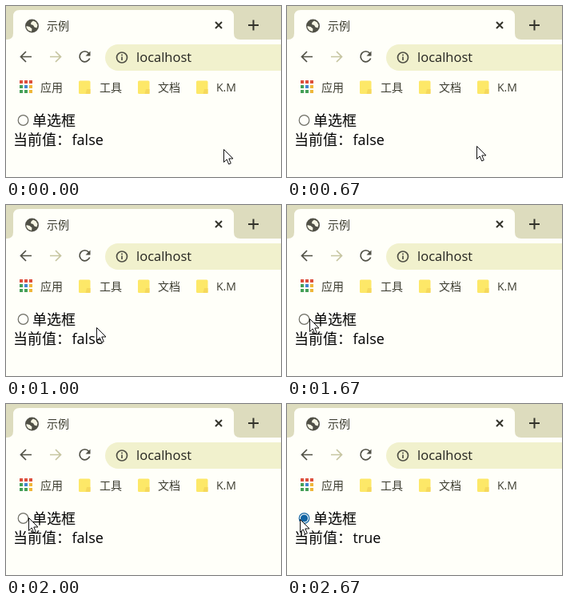
These frames come from a looping animation (344x214 px, 3010 ms). An HTML page:

```html
<!DOCTYPE html>
<html lang="zh-CN">
<head>
<meta charset="utf-8">
<title>示例</title>
<style>
  html, body { margin: 0; width: 100%; height: 100%; overflow: hidden; background: #fffff9; }
  svg { display: block; width: 344px; height: 214px; }
  text { font-family: "Open Sans", "Noto Sans CJK SC", "Noto Sans CJK", sans-serif; }
  .label { font-size: 14px; fill: #3c3c30; }
  .page { font-size: 18px; fill: #000; }
  .icon { fill: none; stroke: #505046; stroke-width: 1.7; }
  .strong { stroke: #33332b; stroke-width: 2; }
  .faint { stroke: #c6c5a0; }
</style>
</head>
<body>
<svg viewBox="0 0 344 214">
  <defs>
    <g id="folder">
      <rect width="14.500" height="16.500" rx="1.500" fill="#fde868"/>
      <path d="M10 10.500H14.500V16.500H8.500Z" fill="#f5d85c"/>
    </g>
    <path id="arrow" d="M7 -6.500L.500 0L7 6.500M.500 0H14"/>
  </defs>

  <!-- tab strip -->
  <path d="M0 0H344V42H0Z" fill="#dddcbe"/>
  <path d="M1 42Q9 42 9 34V13Q9 5 17 5H277Q285 5 285 13V34Q285 42 293 42Z" fill="#fffff9"/>
  <circle cx="32.5" cy="25" r="8.500" fill="#505046"/>
  <path d="M25.500 25L29.500 26L32.500 28.500L32 32L28 30.500L25.700 27.500ZM34 18.500L37.500 20.300L39.500 24L38.500 27.500L35.500 26.500L34 24L31 23L31.500 20.500Z" fill="#f6f5e4"/>
  <text class="label" x="51" y="30">示例</text>
  <path class="icon strong" d="M262 20L270 28M270 20L262 28"/>
  <path class="icon strong" d="M303 24H316M309.500 17.500V30.500"/>

  <!-- toolbar -->
  <use href="#arrow" class="icon" x="18" y="63.5"/>
  <use href="#arrow" class="icon faint" transform="translate(69 63.5) scale(-1 1)"/>
  <path class="icon" d="M103.500 59A6.500 6.500 0 1 0 104.700 65.500"/>
  <path d="M105.500 56.500V62.500H99.500Z" fill="#505046"/>
  <rect x="124" y="48" width="240" height="33" rx="16.500" fill="#f1f1cd"/>
  <g class="icon">
    <circle cx="145" cy="64.5" r="6.500"/>
    <path d="M145 63.500V68M145 60.500V62.200"/>
  </g>
  <text x="163" y="70" font-size="16.500" fill="#24241f">localhost</text>

  <!-- bookmarks -->
  <g id="apps"></g>
  <text class="label" x="43" y="107">应用</text>
  <use href="#folder" x="91" y="93.500"/>
  <text class="label" x="117" y="107">工具</text>
  <use href="#folder" x="165" y="93.500"/>
  <text class="label" x="190" y="107">文档</text>
  <use href="#folder" x="238" y="93.500"/>
  <text class="label" x="263" y="107">K.M</text>

  <!-- page -->
  <circle id="ring" cx="21.5" cy="143" r="6.300" fill="#fffffa" stroke-width="1.200"/>
  <circle id="dot" cx="21.5" cy="143" r="4.600" fill="#1264a3"/>
  <text class="page" x="33" y="150">单选框</text>
  <text class="page" x="9" y="174">当前值：</text>
  <text class="page" id="value" x="82.500" y="174"></text>
  <path id="cursor" d="M.500 .500V16.500L4.200 13L6.700 19L9.300 17.900L6.800 12H12Z" fill="#fff" stroke="#111"/>
</svg>
<script>
  const LOOP = 3010, CLICK = 2330;
  // [start time, cursor x, cursor y]
  const stops = [
    [0, 272, 179], [670, 237, 175], [1000, 113, 153],
    [1330, 34, 142], [1670, 28, 142], [2330, 16, 144]
  ];
  const el = id => document.getElementById(id);
  const red = "#dd4f3c", green = "#45a058", blue = "#4285d0", yellow = "#efb73a";
  const tiles = [red, red, red, green, blue, yellow, green, green, yellow];
  el("apps").innerHTML = tiles.map((fill, i) =>
    `<rect x="${17 + i % 3 * 6}" y="${93 + Math.floor(i / 3) * 6}" width="4" height="4" fill="${fill}"/>`).join("");

  const start = performance.now();
  function draw() {
    const t = (performance.now() - start) % LOOP, on = t >= CLICK;
    const [, x, y] = stops.filter(s => s[0] <= t).pop();
    el("cursor").setAttribute("transform", `translate(${x} ${y})`);
    el("ring").setAttribute("stroke", on ? "#1264a3" : "#6d6d64");
    el("dot").setAttribute("visibility", on ? "visible" : "hidden");
    el("value").textContent = on ? "true" : "false";
    requestAnimationFrame(draw);
  }
  draw();
</script>
</body>
</html>
```
